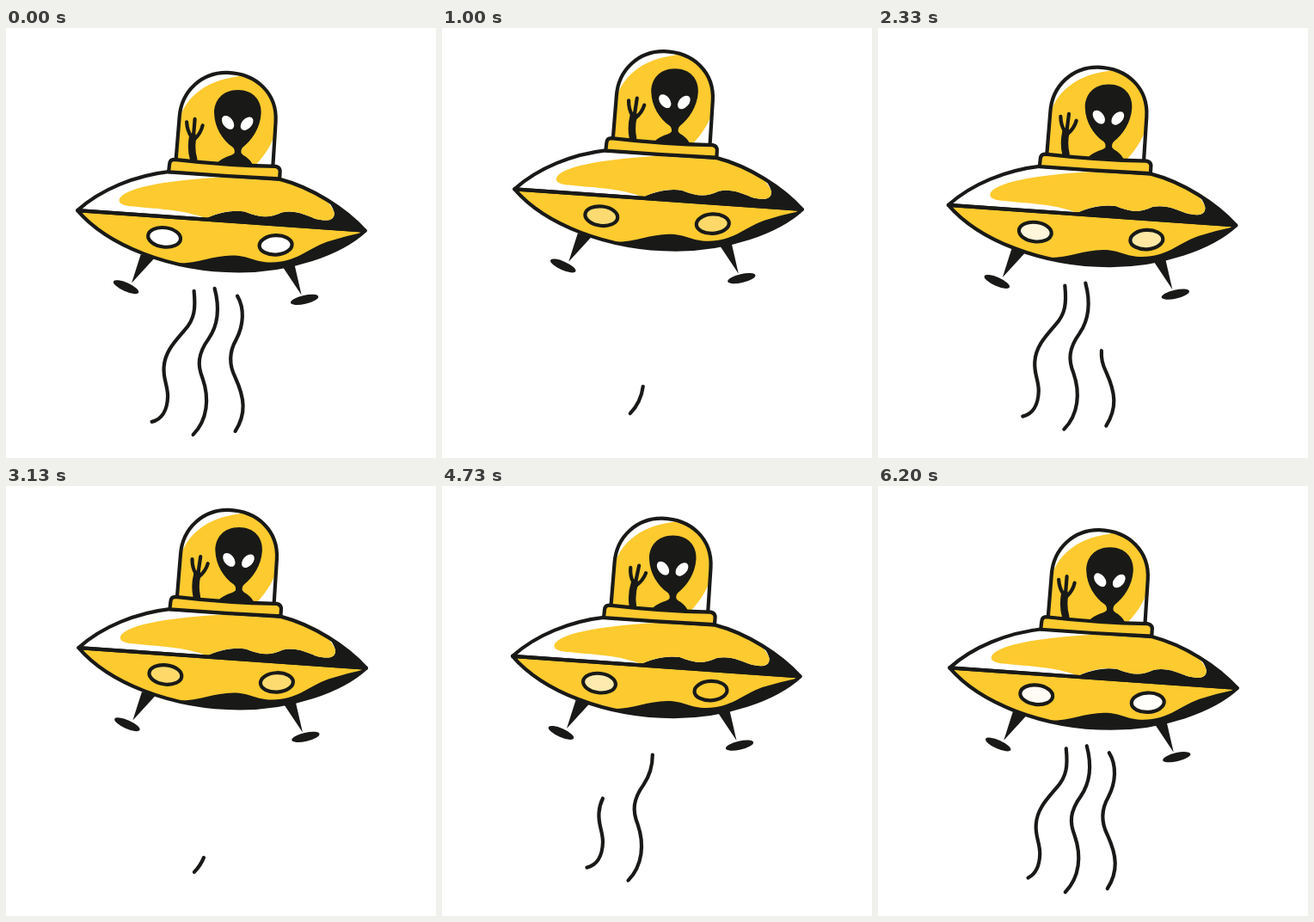
Animation of 500x500 px, one loop 6.23 s. Source, as an HTML page:

```html
<!DOCTYPE html>
<html lang="en">
<head>
<meta charset="utf-8">
<title>Waving saucer</title>
<style>
  html, body { margin: 0; width: 100%; height: 100%; overflow: hidden; background: #fff; }
  svg { display: block; width: 100vw; height: 100vh; }
  .ink { fill: #191a18; }
  .sun { fill: #fdca2f; }
  .white { fill: #fff; }
  .line { fill: none; stroke: #191a18; stroke-width: 4.2; stroke-linecap: round; stroke-linejoin: round; }
</style>
</head>
<body>
<svg viewBox="0 0 500 500">
  <defs>
    <path id="dome" d="M196.500 159 L201 104 C203 72 228 51 256.500 51.500 C291 52.500 315 76 313 109 L309.500 164 Z"/>
    <path id="top" d="M82.500 211.700 C110 187 150 171 190 166.500 L318 175.500 C355 185 394 210 417 235.300 Z"/>
    <path id="belly" d="M82.500 211.700 C117 252 190 282 270 282 C330 282 388 262 417 235.300 Z"/>
    <clipPath id="domeClip"><use href="#dome"/></clipPath>
    <clipPath id="topClip"><use href="#top"/></clipPath>
    <clipPath id="bellyClip"><use href="#belly"/></clipPath>
  </defs>
  <g id="ship">
    <g class="line">
      <path class="trail" pathLength="1" d="M218 305.500 C220 325 219 338 207 351 C196 364 184 376 183 394 C182 408 187.500 415 187.500 428 C187 445 180 455 169 457.500"/>
      <path class="trail" pathLength="1" d="M242 302.500 C248 325 246 345 235 361 C222 379 222 392 228 407 C236 430 234 455 217 472.500"/>
      <path class="trail" pathLength="1" d="M268 310.500 C277 325 276 345 267 362 C259 376 258 390 266 406 C277 430 279 448 266 468.500"/>
    </g>

    <g class="ink">
      <path d="M156 263 L173 266 L145.500 296 Z M321 277 L335 275 L343 310 Z"/>
      <ellipse cx="139" cy="300.800" rx="16" ry="5" transform="rotate(24 139 300.800)"/>
      <ellipse cx="346.500" cy="315.500" rx="16.500" ry="5" transform="rotate(-13 346.500 315.500)"/>
    </g>

    <use href="#dome" class="white"/>
    <g clip-path="url(#domeClip)">
      <path class="sun" d="M190 165 L200 109 C206 83 229 61 268 56 L290 50 L320 80 L314 118 C308 138 298 151 284 165 Z"/>
      <g id="arm" class="line">
        <path d="M209.500 109 Q210 119 215 126 M219 105.500 L217.500 124 M228 113 Q226 122 218.500 129"/>
        <path d="M216.500 126 Q214 140 217.500 152 L218 190" stroke-width="8.500" style="stroke-width:8.500"/>
      </g>
      <path class="ink" d="M269 71.500 C287 71.500 297 84 296 99 C295 116 285 130 275 138 Q272 141 273 145 C276 149 283 150 287 160 L243 160 C247 150 261 149 265 145 Q266 141 263 138 C251 130 242 115 241.500 99 C241 84 251 71.500 269 71.500 Z"/>
      <g class="white">
        <ellipse cx="257.500" cy="109.500" rx="5.800" ry="9" transform="rotate(-38 257.500 109.500)"/>
        <ellipse cx="279.500" cy="110.800" rx="5.800" ry="9" transform="rotate(42 279.500 110.800)"/>
      </g>
    </g>
    <use href="#dome" class="line"/>

    <use href="#top" class="white"/>
    <g clip-path="url(#topClip)">
      <path class="ink" d="M225 224 C246 214 262 211 277 213 C294 220 306 221 320 214 C335 211 348 217 358 221 C372 225 382 224 381 214 C378 202 366 190 345 180 L430 180 L420 240 Z"/>
      <path class="sun" d="M131 199 C136 186 180 177 250 173 L330 178 C362 189 377 202 381 214 C382 224 372 225 358 221 C348 217 335 211 320 214 C306 221 294 220 277 213 C262 211 246 214 232 221 C205 210 172 210 148 207 Q130 206 131 199 Z"/>
    </g>
    <use href="#belly" class="sun"/>
    <path class="ink" clip-path="url(#bellyClip)" d="M195 273 C222 274 240 264 262 264 C282 264 288 272 308 272 C336 272 349 257 373 248 Q395 241 420 236 L420 290 L195 290 Z"/>
    <use href="#top" class="line"/>
    <use href="#belly" class="line"/>
    <path class="sun" d="M195 152.500 Q255 159.500 313 160.500 Q319 162 318 168 L317.500 175 Q253 172 188.500 167 L189.500 158 Q190 152.500 195 152.500 Z" stroke="#191a18" stroke-width="4.200" stroke-linejoin="round"/>

    <g stroke="#191a18" stroke-width="4.200">
      <ellipse class="lamp" cx="183.500" cy="243" rx="19" ry="11.200" transform="rotate(7 183.500 243)"/>
      <ellipse class="lamp" cx="313" cy="252" rx="19" ry="11.200" transform="rotate(-3 313 252)"/>
    </g>
  </g>
</svg>
<script>
  const PERIOD = 6230 / 3;
  const ship = document.getElementById('ship');
  const arm = document.getElementById('arm');
  const trails = document.querySelectorAll('.trail');
  const lamps = document.querySelectorAll('.lamp');

  // Phases at which each trail starts to vanish and to grow back, and how long vanishing takes
  const trailTimes = [
    { vanish: 0.133, grow: 0.69, span: 0.305 },
    { vanish: 0.237, grow: 0.61, span: 0.305 },
    { vanish: -0.001, grow: 0.54, span: 0.276 },
  ];
  const GROW_SPAN = 0.305;
  const lampDark = [0.71, 0.28];

  const swayKeys = [[0, 0.6], [0.12, -0.7], [0.28, -0.5], [0.48, 1.8], [0.6, 2.2], [0.85, 2.2], [1, 0.6]];
  const waveKeys = [[0, 0], [0.122, 2.5], [0.28, 7.3], [0.34, 7.1], [0.49, 3.9], [0.8, -1.2], [1, 0]];
  const liftKeys = [[0, 0.4], [0.487, -24.6], [1, 0.4]];

  const clamp = v => Math.min(1, Math.max(0, v));

  function track(keys, p) {
    const i = Math.max(1, keys.findIndex(k => k[0] >= p));
    const [p0, v0] = keys[i - 1], [p1, v1] = keys[i];
    return v0 + (v1 - v0) * (p - p0) / (p1 - p0);
  }

  function drawTrail(path, { vanish, grow, span }, p) {
    const growing = p >= grow;
    const tail = clamp((p - vanish - (growing ? 1 : 0)) / span);
    const head = growing ? clamp((p - grow) / GROW_SPAN) : 1;
    const length = head - tail;
    path.style.visibility = length > 0.002 ? 'visible' : 'hidden';
    path.setAttribute('stroke-dasharray', `${Math.max(length, 0)} 3`);
    path.setAttribute('stroke-dashoffset', -tail);
  }

  function lampColor(white) {
    const mix = (from, to) => Math.round(from + (to - from) * white);
    return `rgb(${mix(253, 255)},${mix(202, 255)},${mix(47, 255)})`;
  }

  function render(ms) {
    const p = (ms / PERIOD) % 1;
    ship.setAttribute('transform', `translate(${track(swayKeys, p)} ${track(liftKeys, p)})`);
    arm.setAttribute('transform', `rotate(${track(waveKeys, p)} 217 190)`);
    trails.forEach((path, i) => drawTrail(path, trailTimes[i], p));
    lamps.forEach((lamp, i) => {
      lamp.setAttribute('fill', lampColor(track([[0, 1], [lampDark[i], 0], [1, 1]], p)));
    });
  }

  const start = performance.now();
  function tick() {
    render(performance.now() - start);
    requestAnimationFrame(tick);
  }
  tick();
</script>
</body>
</html>
```
